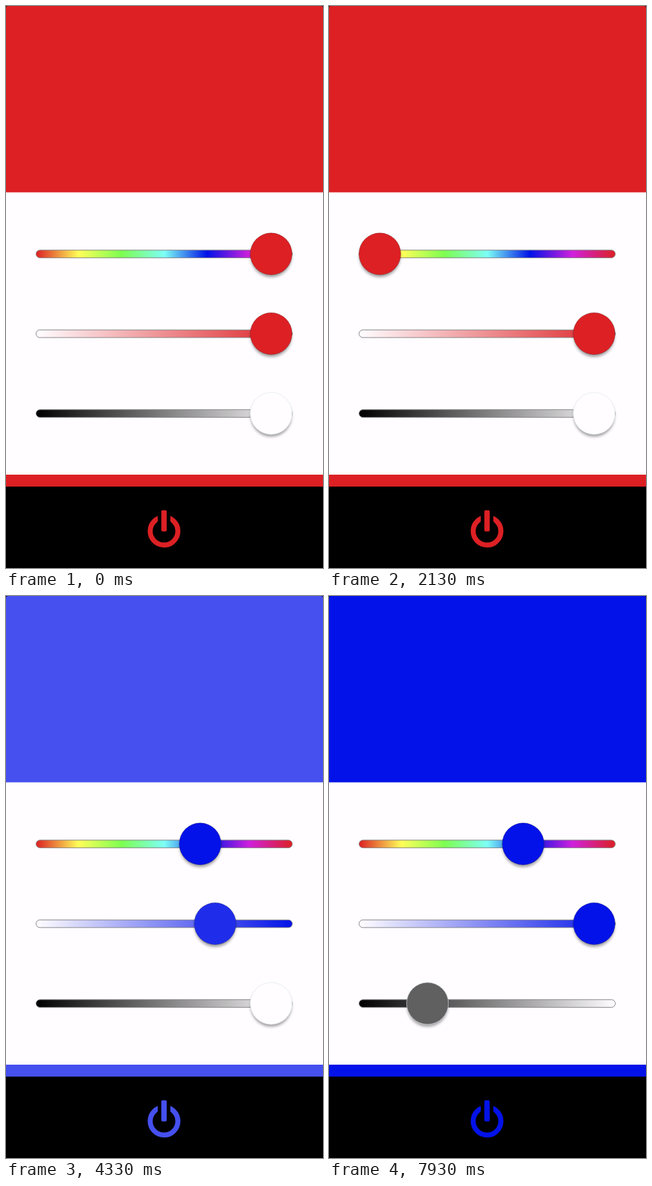
Recreate the animation shown at these times as an HTML page. Size 480 by 849 pixels, loop 8000 ms.

```html
<!DOCTYPE html>
<html lang="en">
<head>
<meta charset="utf-8">
<title>Light colour sliders</title>
<style>
  html, body { margin: 0; width: 100%; height: 100%; overflow: hidden; background: #000; }
  svg { display: block; width: 100%; height: 100%; }
</style>
</head>
<body>
<svg viewBox="0 0 480 849" preserveAspectRatio="none">
  <defs>
    <linearGradient id="hue"></linearGradient>
    <linearGradient id="sat"><stop stop-color="#fffdff"/><stop id="satEnd" offset="1"/></linearGradient>
    <linearGradient id="bri"><stop stop-color="#000"/><stop offset="1" stop-color="#fffdff"/></linearGradient>
    <filter id="blur" x="-20%" y="-20%" width="140%" height="140%"><feGaussianBlur stdDeviation="2"/></filter>
  </defs>
  <rect width="480" height="849"/>
  <g id="light">
    <path d="M0 282V3Q0 0 3 0H477Q480 0 480 3V282Z"/>
    <rect y="707" width="480" height="19"/>
    <circle cx="239.3" cy="793.3" r="21" fill="none" stroke="currentColor" stroke-width="7.6"/>
    <rect x="229.8" y="765" width="19" height="26" fill="#000"/>
    <rect x="235.2" y="761.8" width="8.2" height="32" rx="2"/>
  </g>
  <rect y="281.5" width="480" height="426.5" fill="#fffdff"/>
  <g id="sliders"></g>
</svg>
<script>
const LOOP = 8000, LAG = 150;   // knob colours trail the finger by LAG ms
const MIN = 77, MAX = 401.5;
const BLACK = [0, 0, 0], WHITE = [255, 253, 255];
const HUES = [
  [220, 32, 36], [255, 255, 88], [125, 255, 80], [125, 255, 245],
  [0, 18, 232], [208, 32, 220], [220, 32, 36]
];
// [time, x] of each knob while it is dragged
const DRAGS = {
  hue: [[1000, MAX], [1250, 329], [1400, 233.5], [1800, MIN], [2300, MIN],
        [2650, 171], [2800, 231.5], [3250, 294]],
  sat: [[3900, MAX], [4180, 365], [4330, 317], [4950, 90], [5380, 193],
        [5530, 225], [6050, 330], [6200, MAX]],
  bri: [[7200, MAX], [7780, 200], [7930, 149.5], [8000, 130]]
};
const ROWS = { hue: 374.5, sat: 495, bri: 615.5 };

const $ = id => document.getElementById(id);
const css = c => `rgb(${c.map(Math.round)})`;
const mix = (a, b, k) => a.map((v, i) => v + (b[i] - v) * k);
const clamp = (v, lo, hi) => Math.max(lo, Math.min(hi, v));

// Smooth interpolation that never overshoots its points
function along(pts, t) {
  const last = pts.length - 1;
  if (t <= pts[0][0]) return pts[0][1];
  if (t >= pts[last][0]) return pts[last][1];
  const slope = i => (pts[i + 1][1] - pts[i][1]) / (pts[i + 1][0] - pts[i][0]);
  const tangent = i => {
    if (i === 0 || i === last) return 0;
    const a = slope(i - 1), b = slope(i);
    return a * b <= 0 ? 0 : 2 * a * b / (a + b);
  };
  let i = 0;
  while (t > pts[i + 1][0]) i++;
  const [t0, x0] = pts[i], [t1, x1] = pts[i + 1];
  const h = t1 - t0, s = (t - t0) / h, r = 1 - s;
  return x0 * r * r * (1 + 2 * s) + x1 * s * s * (3 - 2 * s)
    + h * s * r * (r * tangent(i) - s * tangent(i + 1));
}

const level = (name, t) => clamp((along(DRAGS[name], t) - MIN) / (MAX - MIN), 0, 1);

function hueAt(t) {
  const p = level('hue', t) * 6, i = Math.min(5, Math.floor(p));
  return mix(HUES[i], HUES[i + 1], p - i);
}
const colourAt = t => mix(WHITE, hueAt(t), level('sat', t));

$('hue').innerHTML = HUES.map((c, i) => `<stop offset="${i / 6}" stop-color="${css(c)}"/>`).join('');
$('sliders').innerHTML = Object.entries(ROWS).map(([name, y]) => `
  <rect x="45.5" y="${y - 5.7}" width="388" height="11.6" rx="5.8" fill="url(#${name})" stroke="#858588"/>
  <g id="${name}Knob">
    <circle cy="4" r="31" fill="#000" opacity=".38" filter="url(#blur)"/>
    <circle class="face" r="31.7" stroke="${name === 'bri' ? '#dfe5ec' : '#333'}"
      stroke-opacity="${name === 'bri' ? 1 : .4}" stroke-width=".7"/>
  </g>`).join('');

const knobs = {};
for (const name in ROWS) {
  const group = $(name + 'Knob');
  knobs[name] = { group, face: group.querySelector('.face') };
}

function draw(t) {
  const late = t - LAG, hue = hueAt(late);
  const faces = { hue, sat: colourAt(late), bri: mix(BLACK, WHITE, level('bri', late)) };
  for (const name in knobs) {
    const { group, face } = knobs[name];
    group.setAttribute('transform', `translate(${along(DRAGS[name], t)} ${ROWS[name]})`);
    face.setAttribute('fill', css(faces[name]));
  }
  $('satEnd').setAttribute('stop-color', css(hue));
  const glow = css(colourAt(t));
  $('light').setAttribute('fill', glow);
  $('light').setAttribute('color', glow);
}

const start = performance.now();
function tick() {
  draw((performance.now() - start) % LOOP);
  requestAnimationFrame(tick);
}
tick();
</script>
</body>
</html>
```
